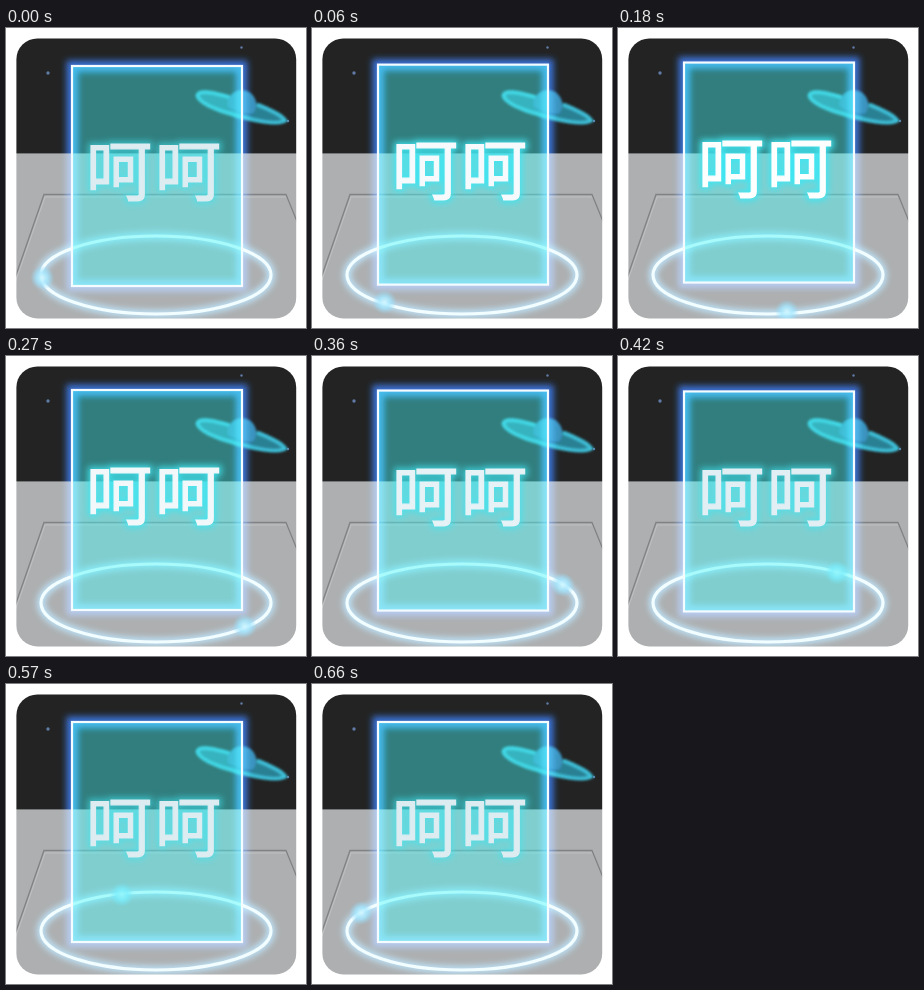
Animation of 300 by 300 pixels, one loop 690 ms. Source, as an HTML page:

```html
<!DOCTYPE html>
<html lang="zh">
<head>
<meta charset="utf-8">
<style>
html, body { margin: 0; width: 100%; height: 100%; overflow: hidden; background: #fff; }
svg { display: block; width: 100vw; height: 100vh; }
text { font: 400 66px "Noto Sans CJK SC", "Noto Sans CJK", sans-serif; letter-spacing: 3px; }
.light { mix-blend-mode: screen; }
</style>
</head>
<body>
<svg viewBox="0 0 300 300">
  <defs>
    <clipPath id="card"><rect x="10.400" y="10.400" width="279.800" height="280" rx="21"/></clipPath>
    <clipPath id="inside"><rect class="sheet" x="66" y="38" width="170" height="220"/></clipPath>
    <filter id="soft" x="-30%" y="-30%" width="160%" height="160%"><feGaussianBlur stdDeviation=".9"/></filter>
    <filter id="glow" x="-30%" y="-30%" width="160%" height="160%"><feGaussianBlur stdDeviation="3"/></filter>
    <radialGradient id="spark">
      <stop stop-color="#d2f6ff" stop-opacity=".95"/>
      <stop offset=".45" stop-color="#a6e8ff" stop-opacity=".8"/>
      <stop offset="1" stop-color="#8ddcff" stop-opacity="0"/>
    </radialGradient>
  </defs>

  <g clip-path="url(#card)">
    <rect width="300" height="126" fill="#232323"/>
    <rect y="125.400" width="300" height="175" fill="#adafb0"/>
    <g fill="none">
      <path d="M8 254 38 168H280L292 198" stroke="#bfc1c2" transform="translate(1 1)"/>
      <path d="M8 253 38 166.500H280L292 196" stroke="#808283" stroke-width="1.300"/>
    </g>

    <g fill="#5f7ba6">
      <circle cx="42" cy="45" r="1.700"/>
      <circle cx="235.500" cy="19.500" r="1.200"/>
      <circle cx="282" cy="93" r="1.200"/>
    </g>
    <g transform="translate(235 79.500) rotate(15)" filter="url(#soft)">
      <ellipse rx="46" ry="9" fill="#2f9fb8" opacity=".75"/>
      <circle cx="0" cy="-3" r="14.500" fill="#3a92bd"/>
      <path d="M-15 1A15 4 0 0 0 15 1L13 5Q0 8-13 5Z" fill="#266f87"/>
      <path d="M-14 -7Q-46-8-45 0Q-40 9 0 9Q40 9 46 1Q40-4 15-7" fill="none" stroke="#3cbdd6" stroke-width="4"/>
    </g>

    <g fill="none">
      <ellipse class="light" cx="150" cy="247" rx="115" ry="39" stroke="#30a8f0" stroke-width="8" filter="url(#glow)"/>
      <ellipse cx="150" cy="247" rx="115" ry="39" stroke="#f2fdff" stroke-width="3.200"/>
    </g>
    <circle id="ball" r="12" fill="url(#spark)"/>

    <rect class="sheet light" x="66" y="38" width="170" height="220" fill="none" stroke="#1c5cd0" stroke-width="11" filter="url(#glow)"/>
    <rect class="sheet" x="66" y="38" width="170" height="220" fill="#47f5f5" fill-opacity=".43"/>
    <g class="light" clip-path="url(#inside)">
      <rect class="sheet" x="66" y="38" width="170" height="220" fill="none" stroke="#1060a0" stroke-width="12" opacity=".55" filter="url(#glow)"/>
    </g>
    <rect class="sheet" x="66" y="38" width="170" height="220" fill="none" stroke="#f4fcff" stroke-width="2.200"/>

    <g id="label">
      <g id="halo" filter="url(#glow)">
        <text x="80" y="167" fill="#40e6f2" stroke="#40e6f2" stroke-width="6">呵呵</text>
      </g>
      <text id="word" x="80" y="167" stroke-width="1.200">呵呵</text>
    </g>
  </g>
</svg>
<script>
const LOOP = 690, STEP = 30, RISE = 540, TOP = 38;
const $ = id => document.getElementById(id);
const ball = $("ball"), label = $("label"), halo = $("halo"), word = $("word");
const sheets = document.querySelectorAll(".sheet");

// Turn along the ring in degrees, counted from its left end.
const turns = [[0, 5], [120, 73], [180, 99.5], [270, 141], [360, 208], [480, 252], [660, 332], [690, 365]];

const point = deg => {
  const a = deg * Math.PI / 180;
  return [150 - 114 * Math.cos(a), 246.5 + 37.5 * Math.sin(a)];
};

const arc = [0];
for (let d = 1; d <= 366; d++) {
  const [x0, y0] = point(d - 1), [x1, y1] = point(d);
  arc.push(arc[d - 1] + Math.hypot(x1 - x0, y1 - y0));
}
const lengthAt = deg => {
  const i = Math.floor(deg);
  return arc[i] + (arc[Math.min(i + 1, 366)] - arc[i]) * (deg - i);
};
const degAt = len => {
  const i = Math.max(1, arc.findIndex(v => v >= len));
  return i - 1 + (len - arc[i - 1]) / (arc[i] - arc[i - 1]);
};

function ballAt(t) {
  const i = turns.findIndex(k => k[0] > t);
  const [t0, d0] = turns[i - 1], [t1, d1] = turns[i];
  const a = lengthAt(d0), b = lengthAt(d1);
  return point(degAt(a + (b - a) * (t - t0) / (t1 - t0)));
}

function draw(t) {
  const u = Math.min(t / RISE, 1);
  const lift = 4 * Math.sin(Math.PI * u);
  const shine = Math.sin(Math.PI * Math.sqrt(u)) ** 2;

  const [x, y] = ballAt(t);
  ball.setAttribute("cx", x);
  ball.setAttribute("cy", y);

  sheets.forEach(s => s.setAttribute("y", TOP - lift));
  label.setAttribute("transform", `translate(0 ${-lift})`);
  halo.setAttribute("opacity", 0.6 + 0.4 * shine);
  const mix = v => Math.round(v + (255 - v) * shine);
  const ink = `rgb(${mix(220)},${mix(236)},${mix(241)})`;
  word.setAttribute("fill", ink);
  word.setAttribute("stroke", ink);
}

function tick() {
  draw(Math.floor(performance.now() % LOOP / STEP) * STEP);
  requestAnimationFrame(tick);
}
draw(0);
tick();
</script>
</body>
</html>
```
